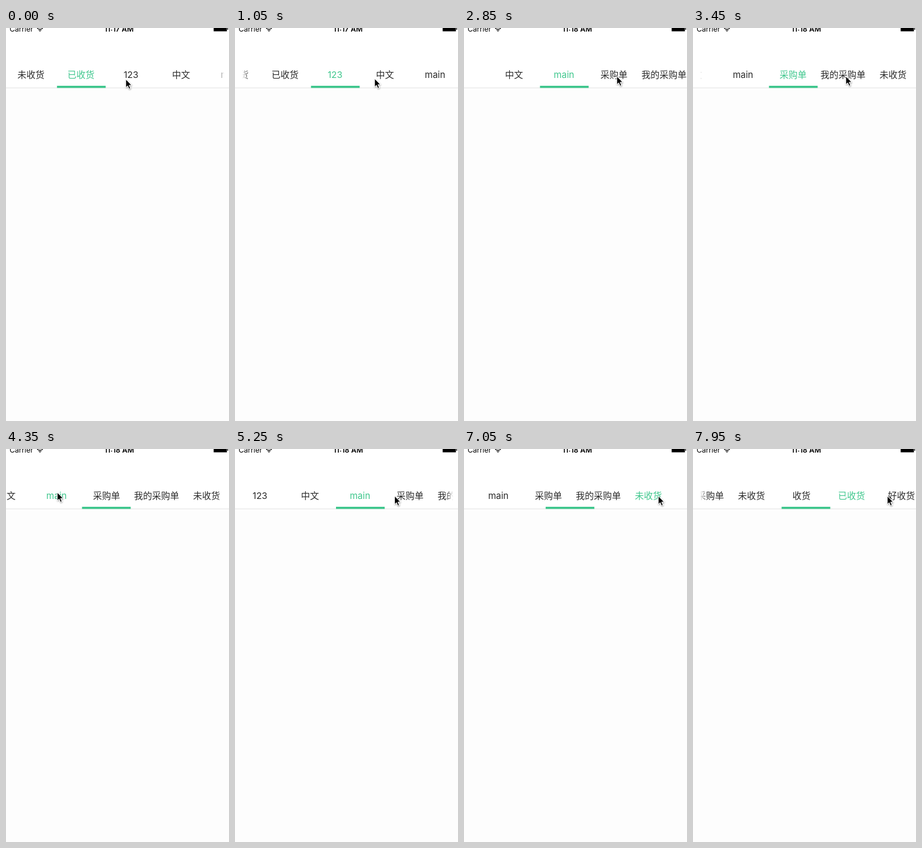
An HTML page that plays this animation: 371 by 653 pixels, repeating every 8 s.

```html
<!DOCTYPE html>
<html lang="zh-CN">
<head>
<meta charset="utf-8">
<title>Scrolling tabs</title>
<style>
  html, body { margin: 0; width: 100%; height: 100%; overflow: hidden; background: #fdfdfd; }
  svg { display: block; }
  text { font-family: Inter, "Noto Sans CJK SC", "Noto Sans CJK", sans-serif; }
  #tabs text { font-size: 15px; text-anchor: middle; fill: #2b2b2b; }
  #tabs text.on { fill: #3fc78d; }
  .status { font-size: 12px; }
  #clock { font-weight: 600; }
</style>
</head>
<body>
<svg width="371" height="653" viewBox="0 0 371 653">
  <defs>
    <linearGradient id="fade">
      <stop offset=".52" stop-color="#fff"/>
      <stop offset="1" stop-color="#fff" stop-opacity="0"/>
    </linearGradient>
    <filter id="shadow" x="-50%" y="-50%" width="200%" height="200%">
      <feDropShadow dx="0.5" dy="1" stdDeviation="0.9" flood-opacity=".45"/>
    </filter>
  </defs>
  <rect width="371" height="99" fill="#fff"/>
  <text class="status" x="6" y="5.5">Carrier</text>
  <g fill="none" stroke="#000" stroke-width="1.5">
    <path d="M52 1.2a6.4 6.4 0 0 1 9 0M53.9 3.3a3.7 3.7 0 0 1 5.2 0"/>
    <path d="M56.5 5.9l-1.5-1.5a2.1 2.1 0 0 1 3 0z" fill="#000" stroke="none"/>
  </g>
  <text class="status" id="clock" x="163.5" y="5.5"></text>
  <path d="M345.5 0h22v5.5h-22zM368.3 0h1.2v3h-1.2z"/>
  <g id="tabs"></g>
  <rect id="veil" width="23" height="26" y="67" fill="url(#fade)"/>
  <rect y="99" width="371" height="1" fill="#e4e4e4"/>
  <rect id="bar" y="96" width="81" height="3.6" fill="#3fc78d"/>
  <path id="cursor" d="M.2 0V14.1L3.4 11.1L5.7 16.4L8.1 15.4L5.8 10.1H10.1Z"
        stroke="#fff" stroke-width="1" filter="url(#shadow)"/>
</svg>
<script>
const LOOP = 8000, STEP = 150, PITCH = 83.2;
const names = ['未收货', '已收货', '123', '中文', 'main', '采购单', '我的采购单',
               '未收货', '收货', '已收货', '好收货'];

// Each tap: time, chosen tab, pointer position
const taps = [
  [375, 2, 203, 85], [1275, 3, 232, 84], [2025, 4, 240, 85], [3075, 5, 254, 80],
  [4335, 4, 85, 72], [5565, 5, 266, 78], [6975, 7, 323, 78], [7817, 9, 323, 78],
];

const el = id => document.getElementById(id);
const mix = (a, b, k) => a + (b - a) * k;
const center = i => (i + 0.5) * PITCH;
const ease = (time, length) => {
  const k = Math.min(1, Math.max(0, time / length));
  return k * k * (3 - 2 * k);
};

const labels = names.map((name, i) => {
  const label = document.createElementNS('http://www.w3.org/2000/svg', 'text');
  label.textContent = name;
  label.setAttribute('x', center(i));
  label.setAttribute('y', 83);
  el('tabs').append(label);
  return label;
});

function stateAt(t) {
  let tab = 1, scroll = 0, bar = center(tab), forward = false, x = 160, y = 85;
  for (const [at, next, px, py] of taps) {
    // The pointer settles 300 ms before it taps
    const glide = ease(t - at + 700, 400);
    x = mix(x, px, glide);
    y = mix(y, py, glide);
    if (t < at) continue;
    // The chosen tab stops short of the middle or past it, by direction
    forward = next > tab;
    scroll = mix(scroll, center(next) - (forward ? 2 : 2.5) * PITCH, ease(t - at, 300));
    bar = mix(bar, center(next), ease(t - at, 252));
    tab = next;
  }
  return { tab, scroll, bar, forward, x, y };
}

function draw(now) {
  const t = Math.floor(now % LOOP / STEP) * STEP;
  const { tab, scroll, bar, forward, x, y } = stateAt(t);
  labels.forEach((label, i) => label.classList.toggle('on', i === tab));
  el('tabs').setAttribute('transform', `translate(${-scroll})`);
  el('bar').setAttribute('x', bar - scroll - 40);
  el('veil').setAttribute('transform', forward ? '' : 'translate(375) scale(-1 1)');
  el('cursor').setAttribute('transform', `translate(${x} ${y})`);
  el('clock').textContent = t < 1800 ? '11:17 AM' : '11:18 AM';
}

let start;
function tick(now) {
  start ??= now;
  draw(now - start);
  requestAnimationFrame(tick);
}
draw(0);
requestAnimationFrame(tick);
</script>
</body>
</html>
```
